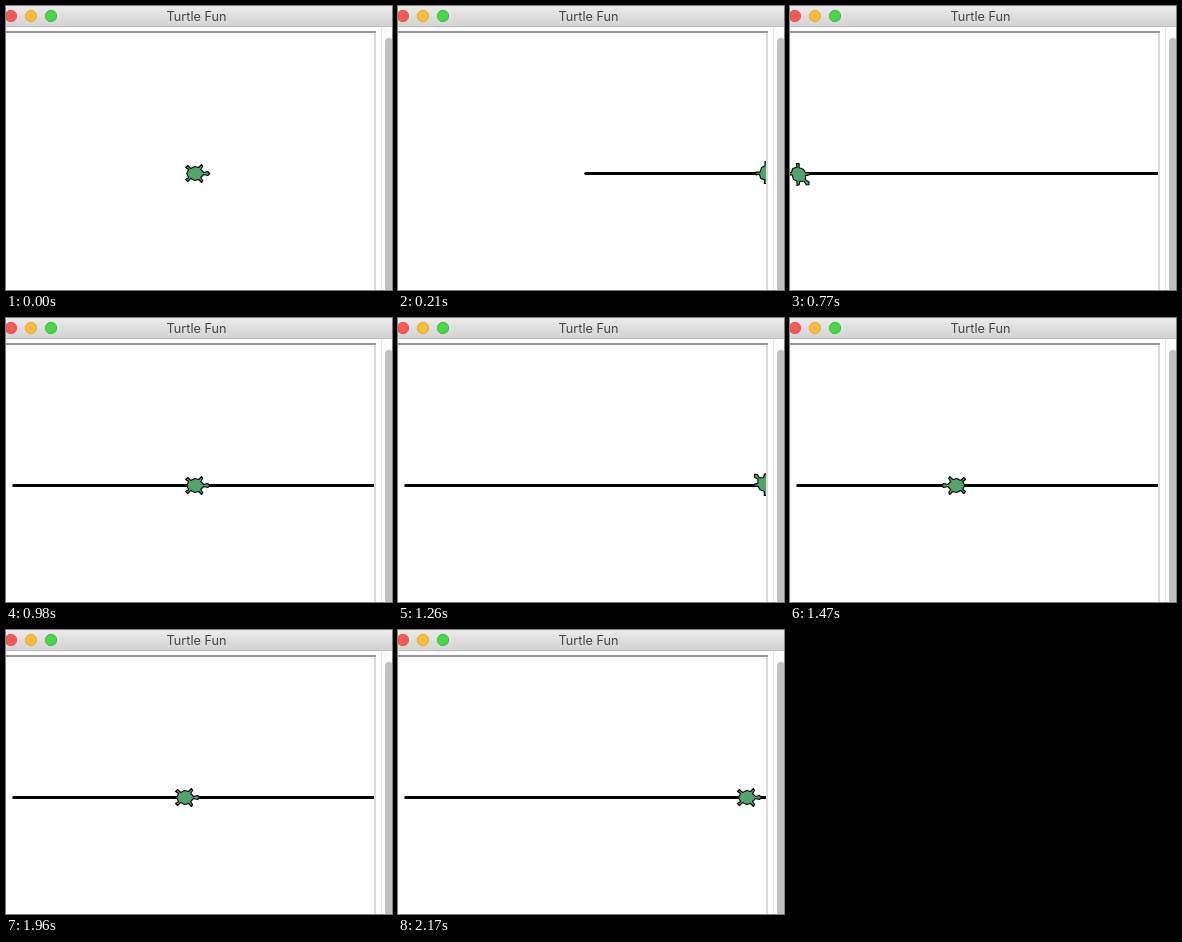
Animation, 386 px wide and 284 px high, one loop 2380 ms. Source, as an HTML page:

```html
<!DOCTYPE html>
<html lang="en">
<head>
<meta charset="utf-8">
<title>Turtle Fun</title>
<style>
  html, body { margin: 0; width: 100%; height: 100%; overflow: hidden; background: #fff; }
  svg { display: block; }
  text { font: 12.7px Inter, "Liberation Sans", sans-serif; fill: #454545; }
</style>
</head>
<body>
<svg width="386" height="284" viewBox="0 0 386 284">
  <defs>
    <linearGradient id="bar" x2="0" y2="1">
      <stop stop-color="#ebebeb"/>
      <stop offset="1" stop-color="#d4d4d4"/>
    </linearGradient>
    <clipPath id="view"><path d="M0 27H368V284H0z"/></clipPath>
  </defs>
  <path fill="url(#bar)" d="M0 0H386V20H0z"/>
  <path fill="#bababa" d="M0 20H386V21H0z"/>
  <g stroke-width=".8">
    <circle cx="5" cy="10" r="5.7" fill="#f45a56" stroke="#d84a46"/>
    <circle cx="25" cy="10" r="5.7" fill="#fbbd3a" stroke="#dca034"/>
    <circle cx="45" cy="10" r="5.7" fill="#49d648" stroke="#38b53a"/>
  </g>
  <text x="190.5" y="15" text-anchor="middle">Turtle Fun</text>
  <path fill="#999" d="M0 25H370V27H0z"/>
  <path fill="#dcdcdc" d="M368 27H370V284H368z"/>
  <path fill="#fafafa" d="M375 21H386V284H375z"/>
  <path fill="#e6e6e6" d="M375 21H376V284H375z"/>
  <rect x="379" y="32" width="8" height="270" rx="4" fill="#c1c1c1"/>
  <g clip-path="url(#view)">
    <path id="trail" fill="none" stroke="#000" stroke-width="3" stroke-linecap="round"/>
    <polygon id="turtle" fill="#50a46c" stroke="#000" stroke-width="1.1" stroke-linejoin="round"/>
  </g>
</svg>
<script>
const STEP = 70, LOOP = 2380, LAST = 31;
const HOME = 187.7, LEFT = HOME - 180, RIGHT = HOME + 180, Y = 167.5;

// Step, x, heading in degrees (counterclockwise)
const KEYS = [
  [0, HOME, 0], [2.5, RIGHT, 0], [4.5, RIGHT, 180],
  [9.5, LEFT, 180], [11.5, LEFT, 360],
  [16.5, RIGHT, 360], [18.5, RIGHT, 540],
  [23, LEFT, 540], [25, LEFT, 720], [31, 347.5, 720]
];

// One side of the turtle from nose to tail: forward, sideways
const SIDE = [[16, 0], [14, 2], [10, 1], [7, 4], [9, 7], [8, 9], [5, 6], [1, 7],
  [-3, 5], [-6, 8], [-8, 6], [-5, 4], [-7, 0]];
const mirrored = SIDE.slice(1, -1).reverse().map(([x, y]) => [x, -y]);

const turtle = document.getElementById("turtle");
const trail = document.getElementById("trail");
turtle.setAttribute("points", [...SIDE, ...mirrored].join(" "));

function pose(step) {
  const k = Math.max(1, KEYS.findIndex(key => key[0] >= step));
  const [t0, x0, a0] = KEYS[k - 1], [t1, x1, a1] = KEYS[k];
  const p = (step - t0) / (t1 - t0);
  return [x0 + (x1 - x0) * p, a0 + (a1 - a0) * p];
}

function draw(now) {
  const step = Math.min(LAST, Math.floor(now % LOOP / STEP));
  const [x, heading] = pose(step);
  const visited = [x, ...KEYS.filter(key => key[0] <= step).map(key => key[1])];
  trail.setAttribute("d", step ? `M${Math.min(...visited)} ${Y}H${Math.max(...visited)}` : "");
  turtle.setAttribute("transform", `translate(${x} ${Y}) rotate(${-heading})`);
}

const start = performance.now();
function tick() {
  draw(performance.now() - start);
  requestAnimationFrame(tick);
}
tick();
</script>
</body>
</html>
```
